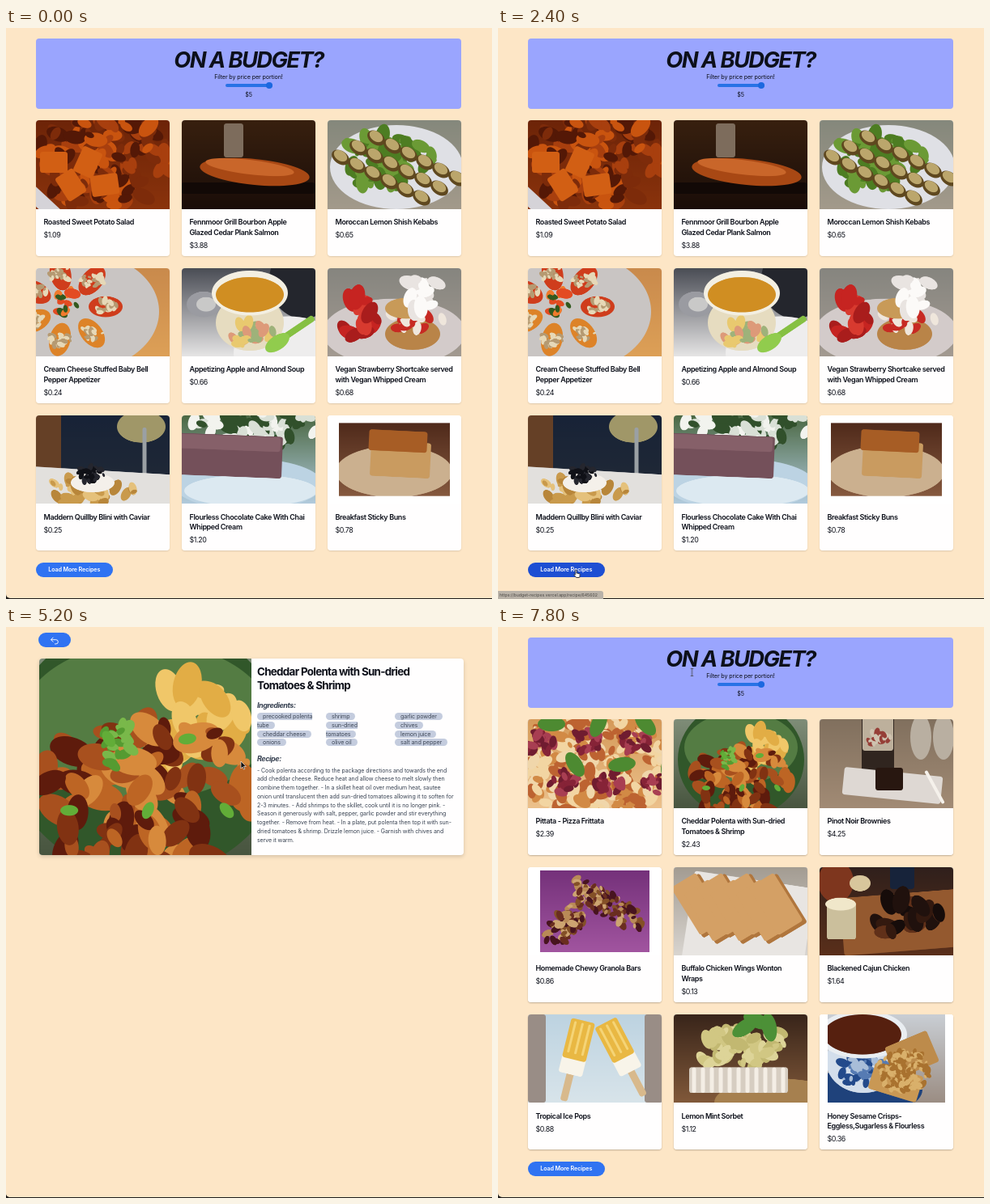
Write an HTML page with a canvas that moves like this. It is 600x706 px and loops after 8000 ms.

```html
<!DOCTYPE html>
<html lang="en">
<head>
<meta charset="utf-8">
<title>Budget recipes</title>
<style>
html, body { margin: 0; width: 100%; height: 100%; overflow: hidden; background: #1d1c1b; }
* { box-sizing: border-box; }
body { font: 7.2px/10.8px Inter, Roboto, sans-serif; letter-spacing: -.13px; color: #0d101a; }
h1, h2, h3, h4, p { margin: 0; white-space: pre; }
#stage { position: relative; width: 600px; height: 706px; overflow: hidden; }
.page { position: absolute; inset: 0 0 1px; background: #fde6c6; border-radius: 0 0 0 5px; overflow: hidden; }
.timed, .glow { opacity: 0; animation: 8s step-end infinite; }

.banner { position: absolute; left: 37px; top: 13px; width: 525px; height: 87px; border-radius: 4px; background: #9aa5fe; text-align: center; }
.banner > * { position: absolute; left: 0; width: 100%; }
h1 { top: 11px; font: italic 700 27.3px/32px Inter, sans-serif; letter-spacing: -1.6px; }
.slider { position: absolute; left: 271px; top: 69px; width: 58px; height: 4px; border-radius: 2px; background: #2872e6; }
.slider::after { content: ""; position: absolute; right: 0; top: -2px; width: 8px; height: 8px; border-radius: 50%; background: #1c68e0; }

.cards { position: absolute; left: 37px; top: 114.3px; display: grid; grid-template-columns: repeat(3, 165px); gap: 14.8px 15px; }
article { position: relative; height: 167.5px; }
.face, .glow { position: absolute; inset: 0; border-radius: 4px; }
.face { overflow: hidden; background: #fffefe; }
article, .detail { border-radius: 4px; box-shadow: 0 1px 2px rgba(0,0,0,.13); }
.glow { box-shadow: 0 11px 23px -4px rgba(0,0,0,.28); }
canvas { display: block; width: 165px; height: 109.5px; }
h3 { padding: 10.2px 0 0 9.5px; font-size: 9px; line-height: 12.75px; font-weight: 600; letter-spacing: -.39px; }
.price { padding: 3.2px 0 0 9.5px; font-size: 8.9px; line-height: 12.75px; letter-spacing: -.4px; }

.button { position: absolute; height: 18px; border-radius: 9px; background: #2f73f2; color: #fff; text-align: center; animation: 8s step-end infinite; }
.more { left: 37px; top: 661px; width: 94.5px; font-weight: 600; line-height: 18px; animation-name: more; }
.back { left: 40px; top: 6.5px; width: 40px; animation-name: back; }

.detail { position: absolute; left: 41px; top: 39px; width: 524px; height: 243px; background: #fffefe; overflow: hidden; box-shadow: 0 2px 5px rgba(0,0,0,.16); }
.detail canvas { width: 262px; height: 243px; }
.detail > :not(canvas) { position: absolute; left: 269px; }
h2 { top: 8.1px; font-size: 13.4px; line-height: 16.4px; letter-spacing: -.7px; }
h4 { font: italic 700 9.1px/12px Inter, sans-serif; letter-spacing: -.5px; color: #374151; }
.column { top: 67px; white-space: nowrap; color: #414a5a; }
.column span { padding: 0 7px; border-radius: 5px; background: #c4ccde; }
.method { top: 133.5px; font-size: 7px; letter-spacing: -.08px; color: #374151; }

.status { position: absolute; left: 0; bottom: 0; width: 130px; height: 10px; padding-left: 2px; border-radius: 0 3px 0 0; background: #b9b2a8; color: #4a4743; font-size: 5.2px; line-height: 10px; letter-spacing: 0; white-space: nowrap; }
#cursor { position: absolute; left: 0; top: 0; animation: path 8s linear infinite; }
#cursor svg { position: absolute; left: -20px; top: -20px; }

@keyframes second { 37.5% { opacity: 1 } }
@keyframes detail { 60% { opacity: 1 } 87.5% { opacity: 0 } }
@keyframes cake { 12.5% { opacity: 1 } 22.5% { opacity: 0 } }
@keyframes blini { 22.5% { opacity: 1 } 27.5% { opacity: 0 } }
@keyframes pops { 42.5% { opacity: 1 } 47.5% { opacity: 0 } }
@keyframes bars { 47.5% { opacity: 1 } 55% { opacity: 0 } }
@keyframes polenta { 55% { opacity: 1 } 60% { opacity: 0 } }
@keyframes cakeLink { 15% { opacity: .6 } 20% { opacity: 1 } 22.5% { opacity: 0 } }
@keyframes bliniLink { 22.5% { opacity: 1 } 32.5% { opacity: 0 } }
@keyframes more { 27.5% { background: #1d4fd3 } 42.5% { background: #2f73f2 } }
@keyframes back { 77.5% { background: #1d4fd3 } 87.5% { background: #2f73f2 } }
@keyframes hand { 12.5% { opacity: 1 } 60% { opacity: 0 } 77.5% { opacity: 1 } 87.5% { opacity: 0 } }
@keyframes arrow { 10% { opacity: 1 } 12.5% { opacity: 0 } 60% { opacity: 1 } 77.5% { opacity: 0 } 87.5% { opacity: 1 } 95% { opacity: 0 } }
@keyframes beam { 95% { opacity: 1 } }
@keyframes ring { 32.5% { opacity: 1 } 35% { opacity: 0 } 57.5% { opacity: 1 } 60% { opacity: 0 } 85% { opacity: 1 } 87.5% { opacity: 0 } }
@keyframes path {
  0%, 10% { transform: translate(440px, 470px); animation-timing-function: steps(3) }
  17.5%, 20% { transform: translate(224px, 572px); animation-timing-function: steps(4) }
  30%, 40% { transform: translate(96px, 670px); animation-timing-function: steps(4) }
  50% { transform: translate(104px, 455px); animation-timing-function: steps(3) }
  57.5%, 67.5% { transform: translate(290px, 166px); animation-timing-function: steps(4) }
  77.5%, 90% { transform: translate(66px, 18px); animation-timing-function: steps(3) }
  97.5%, 100% { transform: translate(239.5px, 56px) }
}
</style>
</head>
<body>
<div id="stage">
  <div class="page">
    <div class="banner">
      <h1>ON A BUDGET?</h1>
      <p style="top:43.3px">Filter by price per portion!</p>
      <p style="top:65px">$5</p>
    </div>
    <div class="slider"></div>
    <div class="cards" id="first"></div>
    <div class="cards timed" id="second" style="animation-name:second"></div>
    <div class="button more">Load More Recipes</div>
  </div>
  <div class="page timed" style="animation-name:detail">
    <div class="button back"><svg width="40" height="18" fill="none" stroke="#fff" stroke-width=".9"><path d="M18.4 11.6 15.5 8.7l2.9-2.9M15.5 8.7h6.2a2.6 2.6 0 0 1 0 5.2H20"/></svg></div>
    <div class="detail">
      <canvas id="dish"></canvas>
      <h2>Cheddar Polenta with Sun-dried
Tomatoes &amp; Shrimp</h2>
      <h4 style="top:51.5px">Ingredients:</h4>
      <div class="column"><span>precooked polenta<br>tube</span><br><span>cheddar cheese</span><br><span>onions</span></div>
      <div class="column" style="left:354px"><span>shrimp</span><br><span>sun-dried<br>tomatoes</span><br><span>olive oil</span></div>
      <div class="column" style="left:439px"><span>garlic powder</span><br><span>chives</span><br><span>lemon juice</span><br><span>salt and pepper</span></div>
      <h4 style="top:117.5px">Recipe:</h4>
      <p class="method">- Cook polenta according to the package directions and towards the end
add cheddar cheese. Reduce heat and allow cheese to melt slowly then
combine them together. - In a skillet heat oil over medium heat, sautee
onion until translucent then add sun-dried tomatoes allowing it to soften for
2-3 minutes. - Add shrimps to the skillet, cook until it is no longer pink. -
Season it generously with salt, pepper, garlic powder and stir everything
together. - Remove from heat. - In a plate, put polenta then top it with sun-
dried tomatoes &amp; shrimp. Drizzle lemon juice. - Garnish with chives and
serve it warm.</p>
    </div>
  </div>
  <div id="links"></div>
  <div id="cursor">
    <svg width="40" height="40" viewBox="-20 -20 40 40">
      <circle class="timed" style="animation-name:ring" cx="-.5" cy=".5" r="16.5" fill="none" stroke="#222b45"/>
      <path class="timed" style="animation-name:hand" transform="translate(-2.5)" d="M2 .8a.9.9 0 0 1 1.8 0V4l3.2.8q1 .3.8 1.3L7 9.5H3L.3 6q.2-1 1.7 0Z" fill="#fff" stroke="#111" stroke-width=".8"/>
      <path class="timed" style="animation-name:arrow" d="M0 0V9l2.1-2 1.4 3.1 1.4-.6L3.5 6.5h2.8Z" fill="#111" stroke="#fff" stroke-width=".6"/>
      <path class="timed" style="animation-name:beam" d="M-1.5-4.5h3M0-4.5v9M-1.5 4.5h3" fill="none" stroke="#444" stroke-width=".9"/>
    </svg>
  </div>
</div>
<script>
const W = 165, H = 110;
let pen, seed;
const random = () => (seed = seed * 16807 % 2147483647) / 2147483647;
const repeat = (count, draw) => { for (let i = 0; i < count; i++) draw(i); };

function oval(color, x, y, rx, ry = rx, turn = 0) {
  pen.fillStyle = color;
  pen.beginPath();
  pen.ellipse(x, y, rx, ry, turn, 0, 7);
  pen.fill();
}
function tilted(x, y, turn, draw) {
  pen.save();
  pen.translate(x, y);
  pen.rotate(turn);
  draw();
  pen.restore();
}
// A rounded block around its centre.
function slab(color, x, y, w, h, turn = 0) {
  tilted(x, y, turn, () => {
    pen.fillStyle = color;
    pen.beginPath();
    pen.roundRect(-w / 2, -h / 2, w, h, 3);
    pen.fill();
  });
}
function backdrop(top, bottom) {
  const fade = pen.createLinearGradient(0, 0, 0, H);
  fade.addColorStop(0, top);
  fade.addColorStop(1, bottom);
  pen.fillStyle = fade;
  pen.fillRect(0, 0, W, H);
}
function margins(dx, dy) {
  pen.fillStyle = '#fff';
  for (const x of [0, W - dx]) pen.fillRect(x, 0, dx, H);
  for (const y of [0, H - dy]) pen.fillRect(0, y, W, dy);
}
// Fills an oval region with loose pieces, more of them the smaller they are.
function scatter(colors, x, y, rx, ry, size) {
  repeat(3 * rx * ry / size ** 2, i => {
    const angle = random() * 6.3, reach = Math.sqrt(random()), r = size * (.5 + random());
    oval(colors[i % colors.length], x + Math.cos(angle) * reach * rx, y + Math.sin(angle) * reach * ry, r, r * .6, random() * 3);
  });
}

function sweetPotato() {
  backdrop('#6d2408', '#8a330c');
  scatter(['#a83f0e', '#541806', '#c9540f', '#7d2b0a'], 85, 50, 85, 58, 10);
  repeat(4, i => slab('#d25f14', 22 + i * 21, 52 + i % 2 * 28, 34, 26, i));
  slab('#d5d3d8', 8, 102, 80, 18, .75);
}
function salmon() {
  backdrop('#38200f', '#1a0d08');
  slab('#7d6c5c', 64, 25, 24, 42);
  slab('#120906', 82, 84, W, 14);
  oval('#a84814', 90, 64, 68, 16, .1);
  oval('#c9662a', 84, 58, 55, 9, .12);
}
function kebabs() {
  backdrop('#85887c', '#a39a8b');
  oval('#dfe0e5', 85, 58, 82, 52);
  scatter(['#4d7d22', '#6b9a35'], 72, 50, 60, 32, 10);
  repeat(3, row => repeat(6, i => {
    const x = 60 - row * 22 + i * 20, y = 20 + row * 12 + i * 10;
    oval('#5f481f', x, y + 2, 12, 8, .6);
    oval('#bba66c', x, y, 9, 6, .6);
  }));
}
function pepperBoats() {
  backdrop('#c98a4c', '#dda057');
  oval('#c9c5c3', 54, 54, 98, 74);
  repeat(7, i => {
    const angle = i * .9, x = 40 + 46 * Math.cos(angle), y = 48 + 42 * Math.sin(angle);
    oval(y > 60 ? '#dd8328' : '#cf3d1c', x, y, 21, 13, angle);
    scatter(['#e6d8b7', '#b59a72'], x, y, 14, 8, 4);
  });
  scatter(['#e34b22', '#f07a2c', '#33591f'], 35, 42, 18, 14, 7);
}
function soup() {
  backdrop('#4a4d55', '#e6e5e5');
  oval('#24262d', 150, 15, 42, 48);
  oval('#eeeded', 132, 105, 68, 45);
  oval('#9a9ba1', 27, 45, 21, 16);
  oval('#c9c9c8', 30, 45, 12, 9);
  oval('#e6dcc0', 84, 68, 42, 35);
  scatter(['#e9c96f', '#9eb27a', '#dd9a79'], 84, 82, 30, 14, 7);
  oval('#f3efe2', 84, 31, 47, 28);
  oval('#d08e22', 84, 33, 42, 22);
  slab('#86c043', 143, 75, 48, 8, -.6);
  oval('#91cc4d', 118, 93, 17, 9, -.6);
}
function shortcake() {
  backdrop('#86857f', '#a39a91');
  oval('#d3cbca', 82, 80, 88, 42);
  scatter(['#c62421', '#d83a2f', '#a91d1c'], 38, 65, 24, 30, 11);
  oval('#b98448', 105, 82, 34, 20);
  scatter(['#c72a23', '#efe6dc'], 106, 66, 38, 10, 8);
  oval('#c89a58', 97, 50, 26, 13);
  scatter(['#fcfaf8', '#e9e4e1'], 118, 32, 23, 24, 10);
}
function blini() {
  backdrop('#182337', '#222a36');
  slab('#654026', 14, 35, 34, 80);
  oval('#a09768', 130, 14, 30, 20);
  slab('#9aa0a4', 134, 50, 5, 70);
  slab('#e2e0dd', 85, 96, 190, 54, .06);
  scatter(['#c99a4c', '#e5c17b', '#b8863a'], 65, 95, 58, 16, 8);
  oval('#f4f0ea', 70, 84, 27, 12);
  scatter(['#101117', '#25262e'], 68, 73, 17, 10, 4);
}
function cake() {
  backdrop('#4b6843', '#b2cbdd');
  scatter(['#f2f3ee', '#d9e0d6', '#31502b'], 95, 16, 85, 26, 8);
  oval('#bcd3e3', 82, 86, 92, 32);
  oval('#dce9f1', 85, 94, 82, 20);
  slab('#74505a', 54, 50, 140, 52, .04);
  slab('#866069', 54, 34, 136, 18, .04);
}
function stickyBun() {
  backdrop('#4a2517', '#8b5e42');
  oval('#cbb08f', 82, 70, 72, 32);
  slab('#c99b60', 90, 55, 74, 44, .05);
  slab('#a75d25', 87, 32, 72, 26, .05);
  margins(14, 9.5);
}
function pizza() {
  backdrop('#d59a59', '#ecc18c');
  scatter(['#f2d5a2', '#d28a45', '#f0d6aa', '#bd6331'], 82, 54, 95, 65, 8);
  repeat(6, i => {
    const x = 15 + i * 29, y = i % 2 ? 78 : 28;
    scatter(['#862337', '#a83e52', '#701c30'], x, y, 19, 13, 6);
    oval('#4d8a31', x + 14, y - 22, 17, 9, i);
  });
}
function polenta() {
  backdrop('#7f8d78', '#48553f');
  oval('#31572a', 83, 50, 78, 72);
  oval('#547c43', 83, 35, 70, 44);
  scatter(['#e2ad45', '#f0c769'], 108, 38, 30, 24, 9);
  scatter(['#813212', '#bd6524', '#d78a3c', '#5e1b0c', '#a8501e'], 84, 78, 62, 46, 9);
  scatter(['#559b31', '#79b84a'], 66, 48, 9, 12, 4);
  repeat(5, i => oval('#62ad38', 40 + i * 22, 85 - i % 2 * 40, 5, 3, i));
}
function brownies() {
  backdrop('#81705e', '#a28b75');
  slab('#30251f', 72, 28, 40, 72);
  slab('#bdb09c', 72, 18, 38, 42);
  scatter(['#963f37', '#cfc3b0'], 72, 24, 16, 8, 4);
  repeat(2, i => oval('#b9afa1', 125 + i * 28, 22, 13, 28));
  slab('#ded8d3', 90, 82, 122, 34, .1);
  slab('#281710', 86, 74, 34, 28);
  slab('#f5f1eb', 142, 84, 4, 46, -.5);
}
function granolaBars() {
  backdrop('#733079', '#a356a1');
  const crumbs = ['#b98a57', '#6a2d20', '#845027', '#48141f', '#cda471'];
  tilted(50, 68, -.8, () => scatter(crumbs, 0, 0, 42, 15, 5));
  tilted(98, 46, .58, () => scatter(crumbs, 0, 0, 52, 15, 5));
  margins(15, 4);
}
function wontons() {
  backdrop('#a39c92', '#d9d5d0');
  slab('#e8e5e2', 92, 70, 150, 110, .15);
  repeat(7, i => {
    slab('#b0763d', 34 + i * 16, 48 + i % 2 * 8, 38, 72, -.55);
    slab('#d4a065', 30 + i * 16, 46 + i % 2 * 8, 36, 70, -.55);
  });
}
function cajunChicken() {
  backdrop('#30201c', '#5a2f1a');
  slab('#94592f', 110, 68, 165, 72, -.08);
  oval('#7e361e', 20, 18, 22, 26);
  oval('#d8c69c', 50, 20, 13, 10);
  slab('#17233a', 102, 10, 30, 34);
  scatter(['#20110d', '#33190f', '#603019', '#160c0a'], 104, 62, 46, 22, 12);
  slab('#cbbf9c', 27, 67, 36, 46);
  oval('#f0e7ca', 26, 46, 19, 8);
}
function icePops() {
  backdrop('#bdd3e1', '#d8e4ea');
  repeat(2, i => slab('#998d86', 11 + i * 144, 55, 22, H));
  repeat(2, i => tilted(62 + i * 46, 34, .24 - i * .72, () => {
    slab('#d8b98c', 0, 56, 9, 40);
    slab('#f8f4e9', 0, 30, 30, 24);
    slab('#e9b843', 0, -2, 30, 50);
    repeat(3, rib => slab('#f5d476', rib * 9 - 9, -4, 3, 40));
  }));
}
function sorbet() {
  backdrop('#39251a', '#81593a');
  oval('#a6804f', 130, 110, 80, 30);
  repeat(4, i => scatter(['#d1c783', '#c2b871', '#ddd498'], 50 + i * 22, 48 - i % 2 * 14, 21, 20, 9));
  slab('#d6cdc1', 80, 82, 122, 32);
  repeat(11, i => slab('#f4eee5', 25 + i * 11, 82, 5, 32));
  repeat(3, i => oval('#4c9037', 88 + i * 15, 16 - i % 2 * 8, 18, 9, i - .6));
}
function teaAndCrisps() {
  backdrop('#c9ced4', '#9b8d83');
  oval('#1f427b', 60, 94, 67, 31);
  oval('#d3deeb', 54, 58, 46, 40);
  scatter(['#234a8b', '#567bb3', '#a8bdd8'], 53, 70, 36, 17, 6);
  oval('#e9edf1', 53, 25, 55, 30);
  oval('#56200f', 53, 25, 48, 25);
  slab('#bd8b4b', 114, 50, 56, 42, -.4);
  slab('#c99854', 94, 85, 62, 34, .3);
  scatter(['#d9b06b', '#a9722f'], 104, 70, 32, 26, 4);
  margins(10, 0);
}

const recipes = {
  first: [
    [sweetPotato, 'Roasted Sweet Potato Salad', '$1.09'],
    [salmon, 'Fennmoor Grill Bourbon Apple\nGlazed Cedar Plank Salmon', '$3.88'],
    [kebabs, 'Moroccan Lemon Shish Kebabs', '$0.65'],
    [pepperBoats, 'Cream Cheese Stuffed Baby Bell\nPepper Appetizer', '$0.24'],
    [soup, 'Appetizing Apple and Almond Soup', '$0.66'],
    [shortcake, 'Vegan Strawberry Shortcake served\nwith Vegan Whipped Cream', '$0.68'],
    [blini, 'Maddern Quillby Blini with Caviar', '$0.25', 'blini'],
    [cake, 'Flourless Chocolate Cake With Chai\nWhipped Cream', '$1.20', 'cake'],
    [stickyBun, 'Breakfast Sticky Buns', '$0.78']
  ],
  second: [
    [pizza, 'Pittata - Pizza Frittata', '$2.39'],
    [polenta, 'Cheddar Polenta with Sun-dried\nTomatoes & Shrimp', '$2.43', 'polenta'],
    [brownies, 'Pinot Noir Brownies', '$4.25'],
    [granolaBars, 'Homemade Chewy Granola Bars', '$0.86', 'bars'],
    [wontons, 'Buffalo Chicken Wings Wonton\nWraps', '$0.13'],
    [cajunChicken, 'Blackened Cajun Chicken', '$1.64'],
    [icePops, 'Tropical Ice Pops', '$0.88', 'pops'],
    [sorbet, 'Lemon Mint Sorbet', '$1.12'],
    [teaAndCrisps, 'Honey Sesame Crisps-\nEggless,Sugarless & Flourless', '$0.36']
  ]
};
const links = { cakeLink: 643331, bliniLink: 645602, pops: 663845, bars: 646941, polenta: 637440 };

// Covers the canvas with the picture, centred, at double resolution.
function paint(canvas, picture, w, h) {
  canvas.width = w * 2;
  canvas.height = h * 2;
  pen = canvas.getContext('2d');
  const scale = 2 * Math.max(w / W, h / H);
  pen.translate(w, h);
  pen.scale(scale, scale);
  pen.translate(-W / 2, -H / 2);
  seed = 4711;
  picture();
}
function add(parent, tag, className = '', text = '') {
  const el = document.createElement(tag);
  el.className = className;
  el.textContent = text;
  return parent.appendChild(el);
}

for (const [id, list] of Object.entries(recipes)) {
  for (const [picture, title, price, hover] of list) {
    const card = add(document.getElementById(id), 'article');
    if (hover) add(card, 'div', 'glow').style.animationName = hover;
    const face = add(card, 'div', 'face');
    paint(add(face, 'canvas'), picture, W, H);
    add(face, 'h3', '', title);
    add(face, 'p', 'price', price);
  }
}
paint(document.getElementById('dish'), polenta, 262, 243);
for (const [name, id] of Object.entries(links)) {
  add(document.getElementById('links'), 'div', 'status timed', 'https://budget-recipes.vercel.app/recipe/' + id).style.animationName = name;
}
</script>
</body>
</html>
```
